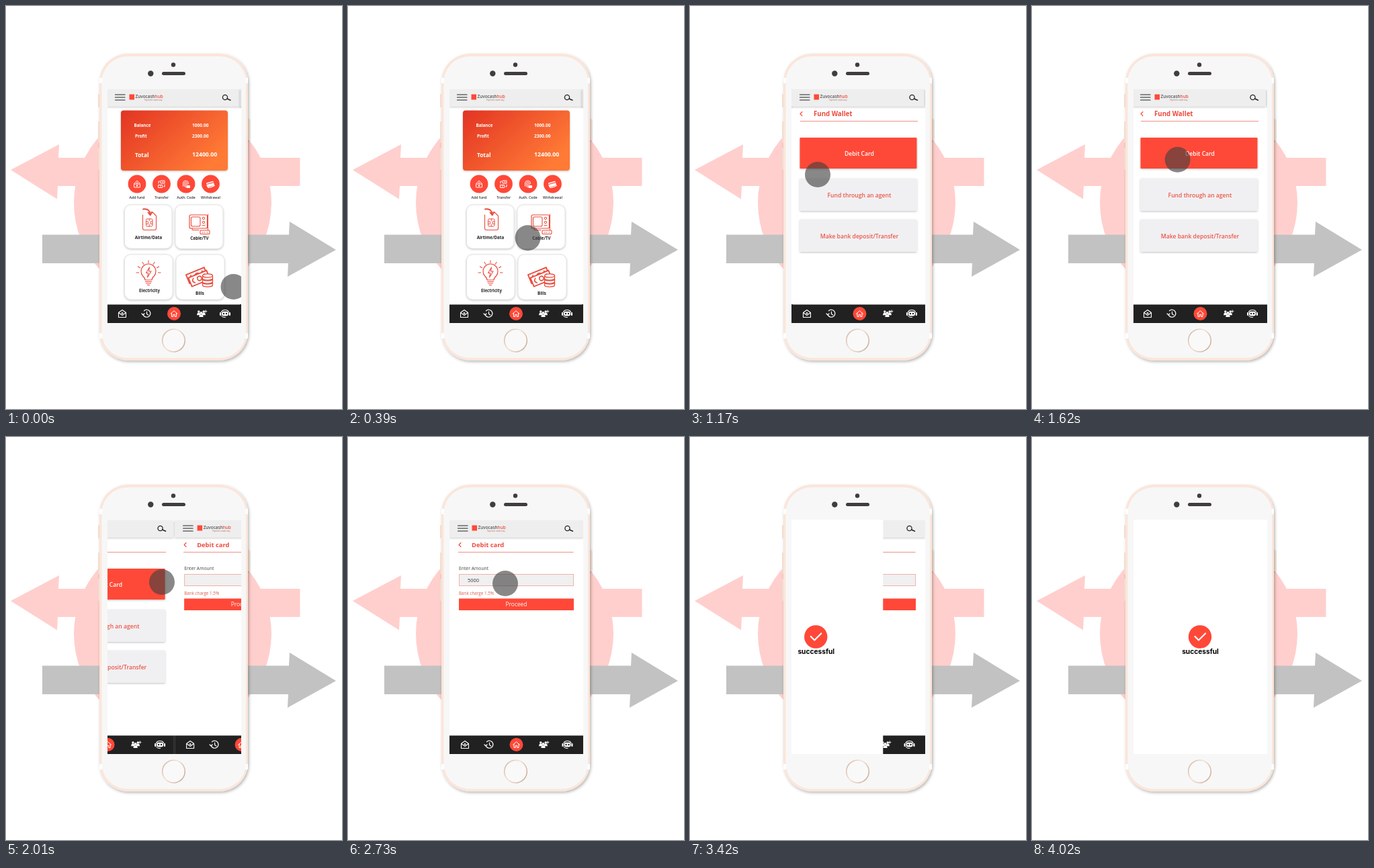
These frames come from a looping animation (500 px wide and 600 px high, 4.05 s). An HTML page:

```html
<!DOCTYPE html>
<html lang="en">
<head>
<meta charset="utf-8">
<title>Wallet top-up</title>
<style>
  html, body { margin: 0; width: 100%; height: 100%; overflow: hidden; background: #fff; }
  svg { display: block; width: 500px; height: 600px; font-family: 'Open Sans', 'Noto Sans', sans-serif; }
</style>
</head>
<body>
<svg id="stage" viewBox="0 0 500 600"></svg>
<script>
const RED = '#ff4838', WIDTH = 199, LOOP = 4050, STEP = 30;

const text = (x, y, size, str, fill = '#222', weight = 600, anchor = 'start') =>
  `<text x="${x}" y="${y}" font-size="${size}" fill="${fill}" font-weight="${weight}" text-anchor="${anchor}">${str}</text>`;
const rect = (x, y, x2, y2, fill, r = 0, more = '') =>
  `<rect x="${x}" y="${y}" width="${x2 - x}" height="${y2 - y}" rx="${r}" fill="${fill}" ${more}/>`;
const disc = (x, y, r, fill, more = '') => `<circle cx="${x}" cy="${y}" r="${r}" fill="${fill}" ${more}/>`;
const line = (d, stroke, w = 1, more = '') =>
  `<path d="${d}" fill="none" stroke="${stroke}" stroke-width="${w}" stroke-linecap="round" stroke-linejoin="round" ${more}/>`;
const at = (x, y, body) => `<g transform="translate(${x} ${y})">${body}</g>`;
const SHADOW = 'filter="url(#soft)"';

const header = (x, searchX) =>
  rect(151, 124, 350, 149.5, '#eee', 0, SHADOW) +
  line(`M${x} 132h14.5m-14.5 4h14.5m-14.5 4h14.5`, '#222', 1.2) +
  rect(x + 21, 131.5, x + 28.5, 139.5, RED) +
  `<text x="${x + 30}" y="137.3" font-size="6.4" font-weight="600" fill="#555">Zuvocash<tspan fill="#e8503f">hub</tspan></text>` +
  text(x + 43.5, 141, 2.7, 'Payments made easy', '#a66', 400) +
  disc(searchX, 136, 3.6, 'none', 'stroke="#222" stroke-width="1.3"') +
  line(`M${searchX + 3} 138l5 2.2`, '#222', 1.5);

const person = (x, y, s) => at(x, y, disc(0, -2.2 * s, 1.9 * s, '#fff') +
  `<path d="M${-3 * s} ${3.6 * s}q0-3.8 ${3 * s}-3.8t${3 * s} 3.8z" fill="#fff"/>`);

const navIcons = [
  line('M-5.5-1.5v7h11v-7l-5.5-4zM-5.5-1.5l5.5 4 5.5-4M0-2v2.5m-1.2-1.2h2.4', '#fff', 1.1),
  line('M-5 1a5.5 5.5 0 1 0 1.5-5.2M-7 0l2 2 2-2M.5-2.8V.6l2.3 1.4', '#fff', 1.2),
  disc(0, 0, 10, RED) + line('M-5 .2l5-4.4 5 4.4M-3.5-.5v5h2.3V1.4h2.4v3.1h2.3v-5', '#fff', 1),
  person(-4.2, -1, .9) + person(3.2, -1, .9) + person(-.5, 1.2, 1.05) + line('M6.2-5.2v3.6m-1.8-1.8h3.6', '#fff', .9),
  line('M-5.5-2.5a6 5 0 0 1 11 0', '#fff', 1.2) + rect(-8, -2, -5.8, 3, '#fff', 1) + rect(5.8, -2, 8, 3, '#fff', 1) +
    rect(-5, -3.2, 5, 3.4, '#fff', 3) + disc(-2, 0, 1.2, '#222') + disc(2, 0, 1.2, '#222') + line('M-5.5 3.5q2 2.5 6 2.2', '#fff', 1)
];
const nav = xs => rect(151, 444.5, 350, 472, '#212121') + xs.map((x, i) => at(x, 458, navIcons[i])).join('');

const title = (x, end, str, size) =>
  line(`M${x + 3} 157.5l-3 3 3 3`, RED, 1.1) + text(184, 164, size, str, '#ed4a3d', 700) +
  rect(164, 171, end, 172, '#ed9187');

const quick = [
  ['Add fund', 195, rect(-4.5, 0, 4.5, 5, 'none', .5, 'stroke="#fff"') + line('M-4.5-.5L0-5l4.5 4.5M-1-1l1-1.5L1-1M0 1.3v2.4m-1.2-1.2h2.4', '#fff', .9)],
  ['Transfer', 231.5, line('M-1-5h5.5v4H-1zM-4.5 1.5H1v4h-5.5zM-4.5-1v-3h1.5M4.5 1v3H3M1.8-3.8v1.6M-1.7 2.7v1.6', '#fff', 1)],
  ['Auth. Code', 268, line('M-4.5 3v-4a4 4 0 0 1 8 0v1M-2.5 4v-5a2 2 0 0 1 4 0v2M-.5 5v-6', '#fff', .9) + rect(.5, 2, 6, 6, '#fff', .7)],
  ['Withdrawal', 304.5, `<g transform="rotate(-15)">${rect(-6.2, -3.2, 5, 3.5, '#fff', 1)}${rect(-6.2, -1.7, 5, -.5, RED)}</g>` + line('M-4 5.3q5 .5 10-3', '#fff', 1.1)]
].map(([label, x, icon]) => disc(x, 265, 13.4, RED) + at(x, 265, icon) + text(x, 287, 5.2, label, '#333', 600, 'middle')).join('');

const INK = '#e94b3c';
const bulbRays = [-180, -150, -120, -90, -60, -30, 0].map(a =>
  `<path d="M14 0h4.5" transform="rotate(${a})" stroke="${INK}"/>`).join('');
const note = '<g transform="rotate(-22)">' + rect(-15, -7, 14, 7, '#fff', 0, `stroke="${INK}" stroke-width="1.8"`) +
  disc(0, 0, 3.2, 'none', `stroke="${INK}" stroke-width="1.6"`) +
  line('M-8.5-3.5q-5 3.5 0 7M8.5-3.5q5 3.5 0 7', INK, 1.6) + '</g>';
const coin = y => `<path d="M-7.5 ${y}v4a7.5 2.6 0 0 0 15 0v-4" fill="#fff" stroke="${INK}" stroke-width="1.3"/>` +
  `<ellipse cy="${y}" rx="7.5" ry="2.6" fill="#fff" stroke="${INK}" stroke-width="1.3"/>`;

const tiles = [
  [176.5, 296, 247, 361, 'Airtime/Data', 212, 347],
  [252, 296, 323, 361.5, 'Cable/TV', 288, 348],
  [176.5, 370, 248, 437, 'Electricity', 213.5, 426],
  [253, 370, 325, 437, 'Bills', 288.5, 430]
].map(([x, y, x2, y2, label, cx, base]) =>
  rect(x, y, x2, y2, '#fff', 9, 'stroke="#ddd" stroke-width=".8" ' + SHADOW) +
  text(cx, base, 6.2, label, '#222', 700, 'middle')).join('');

const art =
  line('M214 307h4l5.5 5.5V331q0 2.5-2.5 2.5h-15q-2.500 0-2.500-2.500V311', INK, 1.1) +
  rect(208.5, 317, 218, 328, 'none', 1.5, `stroke="${INK}"`) + line('M208.5 321h3v3.500h-3M218 321h-3v3.500h3M213.300 317v3m0 5v3', INK, .9) +
  line('M204 302.500q9-1.500 10.500 7M211.500 307.500l3.200 4 2.600-4.500', INK, 1.8) +
  rect(273, 311, 299.500, 331, 'none', 2, `stroke="${INK}" stroke-width="1.2"`) +
  rect(275.500, 314, 289, 328, 'none', 2, `stroke="${INK}" stroke-width="1.1"`) +
  disc(294, 316, 1.7, 'none', `stroke="${INK}"`) + disc(294, 322, 1.7, 'none', `stroke="${INK}"`) +
  line('M292 326.500h4M277 331v2.500h10M300.500 310v24', INK, 1) +
  rect(289, 334, 303, 339.500, '#fff', 1, `stroke="${INK}" stroke-width="1.1"`) + line('M292 337h1m2 0h1m3 0h1', INK, 1.2) +
  at(212, 397, bulbRays + line('M-5 11q0-3-3.500-6a11 11 0 1 1 17 0q-3.500 3-3.500 6zM-4.500 13.500h9m-8 2.500h7m-5 2.500h3', INK, 1.2) +
    line('M1.500-8l-5 8.500h3.200L-1.500 7 4-2H.5z', INK, 1.1)) +
  at(284.500, 401, note) + at(288, 405.500, note) + at(300, 401, coin(10.500) + coin(5.500) + coin(.5));

const home =
  rect(151, 123, 350, 472, '#fff') + header(162.500, 326) +
  rect(171, 155.500, 330, 245, 'url(#card)', 4, SHADOW) +
  text(190.500, 179.500, 6.300, 'Balance', '#fff', 700) + text(277, 179.500, 6.600, '1000.00', '#fff', 700) +
  text(192, 196, 6.300, 'Profit', '#fff', 700) + text(277, 196, 6.600, '2300.00', '#fff', 700) +
  text(192, 225, 8.300, 'Total', '#fff', 700) + text(277, 224, 8.700, '12400.00', '#fff', 700) +
  quick + tiles + art + nav([173, 209, 250, 291, 326]);

const option = (y, y2, fill, str, color) =>
  rect(163.500, y, 337.500, y2, fill, 1, SHADOW) + text(252, (y + y2) / 2 + 3.500, 8.600, str, color, 600, 'middle');
const wallet = rect(153, 123, 352, 472, '#fff') + header(163.500, 330.500) + title(164, 339, 'Fund Wallet', 9.700) +
  option(196, 242, RED, 'Debit Card', '#fff') +
  option(257, 305, '#f0f0f2', 'Fund through an agent', '#ed5548') +
  option(318, 366, '#f0f0f2', 'Make bank deposit/Transfer', '#ed5548') +
  `<g>${rect(151, 444.500, 153, 472, '#212121')}</g>` + nav([174, 210, 252.500, 294, 330]) + rect(350, 444.500, 352, 472, '#212121');

const debit = rect(151, 123, 350, 472, '#fff') + header(163.500, 326.500) + title(165, 335.500, 'Debit card', 9.400) +
  text(165, 198, 6.800, 'Enter Amount', '#444', 400) +
  rect(165.500, 204.500, 335.500, 221.500, '#f0f0f1', 0, 'stroke="#f3a9a1" stroke-width=".9"') +
  `<g id="amount">${text(178, 215.800, 7.400, '5000', '#333', 500)}</g>` +
  text(165, 235, 6.300, 'Bank charge 1.5%', '#dd5a4e', 400) +
  rect(165, 240.500, 336, 258, RED) + text(250.500, 252, 8.400, 'Proceed', '#fff', 400, 'middle') +
  nav([174, 210, 250.500, 291, 326.500]);

const done = rect(151, 123, 350, 472, '#fff') + disc(250, 297.500, 17.200, RED) +
  line('M242.500 297l5.500 5.500 10-10', '#fff', 2.200) +
  `<text x="250.500" y="323" font-family="Inter, sans-serif" font-size="10.200" font-weight="700" text-anchor="middle">successful</text>`;

const PEACH = '#fbe6da';
const phone =
  rect(137, 131, 141, 151, PEACH, 1) + rect(137, 172, 141, 204, PEACH, 1) + rect(137, 211, 141, 244, PEACH, 1) +
  rect(358, 168, 362.500, 200, PEACH, 1, SHADOW) +
  rect(139, 71, 360, 527.500, PEACH, 42, 'filter="url(#drop)"') +
  [107, 487].map(y => rect(139, y, 143, y + 8, '#fff') + rect(356, y, 360, y + 8, '#fff')).join('') +
  rect(142.500, 75, 357, 524, '#f7f7f7', 38) +
  disc(249, 87.500, 3.200, '#413c3e') + disc(215.300, 100.500, 4.200, '#413c3e') + rect(232, 98, 267, 103, '#413c3e', 2.500) +
  disc(249.500, 498, 16.800, '#f9f9f9', 'stroke="url(#ring)" stroke-width="1.600"') + rect(151, 123, 350, 472, '#fff');

const stage = document.getElementById('stage');
stage.innerHTML = `<defs>
  <linearGradient id="card" x1="0" y1="0" x2="1" y2=".6"><stop stop-color="#e23424"/><stop offset="1" stop-color="#ff7a35"/></linearGradient>
  <linearGradient id="ring" x2="1" y2=".6"><stop stop-color="#cfae9b"/><stop offset=".5" stop-color="#f5e2d7"/><stop offset="1" stop-color="#d2b29f"/></linearGradient>
  <filter id="soft" x="-20%" y="-20%" width="140%" height="150%"><feDropShadow dx="0" dy="1" stdDeviation="1.5" flood-opacity=".25"/></filter>
  <filter id="drop" x="-10%" y="-10%" width="120%" height="120%"><feDropShadow dx="1.500" dy="2" stdDeviation="2" flood-opacity=".3"/></filter>
  <clipPath id="screen"><rect x="151" y="123" width="199" height="349"/></clipPath></defs>` +
  disc(248, 293, 147, '#ffcfcd') +
  '<path d="M7 244L79 206 78 226H437.500V268H77L76 287.500z" fill="#ffcfcd"/>' +
  '<path d="M54 340.500H421L422 321 491 363 419 403 420 383H54z" fill="#c2c2c2"/>' + phone +
  `<g clip-path="url(#screen)"><g id="home">${home}</g><g id="wallet">${wallet}</g><g id="debit">${debit}</g>` +
  `<g id="cursor">${disc(0, 0, 19, '#404040', 'opacity=".62"')}</g><g id="done">${done}</g></g>`;

const part = id => document.getElementById(id);
const [homeEl, walletEl, debitEl, doneEl, cursorEl, amountEl] =
  ['home', 'wallet', 'debit', 'done', 'cursor', 'amount'].map(part);
const move = (el, x, y = 0) => el.setAttribute('transform', `translate(${x} ${y})`);
const ramp = (t, start, length) => Math.min(1, Math.max(0, (t - start) / length));

// cubic-bezier(0, 0, .58, 1)
function easeOut(u) {
  let lo = 0, hi = 1;
  for (let i = 0; i < 24; i++) {
    const s = (lo + hi) / 2;
    if (1.74 * s * s - .74 * s ** 3 < u) lo = s; else hi = s;
  }
  return lo * lo * (3 - 2 * lo);
}

// time, x, y
const path = [[0, 338.5, 418], [750, 202, 278], [900, 194, 266], [1170, 190, 251],
  [1880, 232, 216], [2190, 232, 216], [2500, 234, 218], [2760, 234, 218], [3080, 250, 248], [LOOP, 250, 248]];

function cursorAt(t) {
  const i = path.findIndex(p => p[0] > t), a = path[i - 1], b = path[i];
  const u = ramp(t, a[0], b[0] - a[0]);
  return [a[1] + (b[1] - a[1]) * u, a[2] + (b[2] - a[2]) * u];
}

function draw() {
  const t = Math.floor(performance.now() % LOOP / STEP) * STEP;
  const toWallet = easeOut(ramp(t, 985, 200));
  const toDebit = easeOut(ramp(t, 1942, 200));
  const toDone = easeOut(ramp(t, 3120, 600));
  move(homeEl, -WIDTH * toWallet);
  move(walletEl, WIDTH * (1 - toWallet - toDebit) - 2);
  move(debitEl, WIDTH * (1 - toDebit));
  move(doneEl, -WIDTH * (1 - toDone));
  move(cursorEl, ...cursorAt(t));
  amountEl.setAttribute('opacity', ramp(t, 2220, 300));
  requestAnimationFrame(draw);
}
draw();
</script>
</body>
</html>
```
